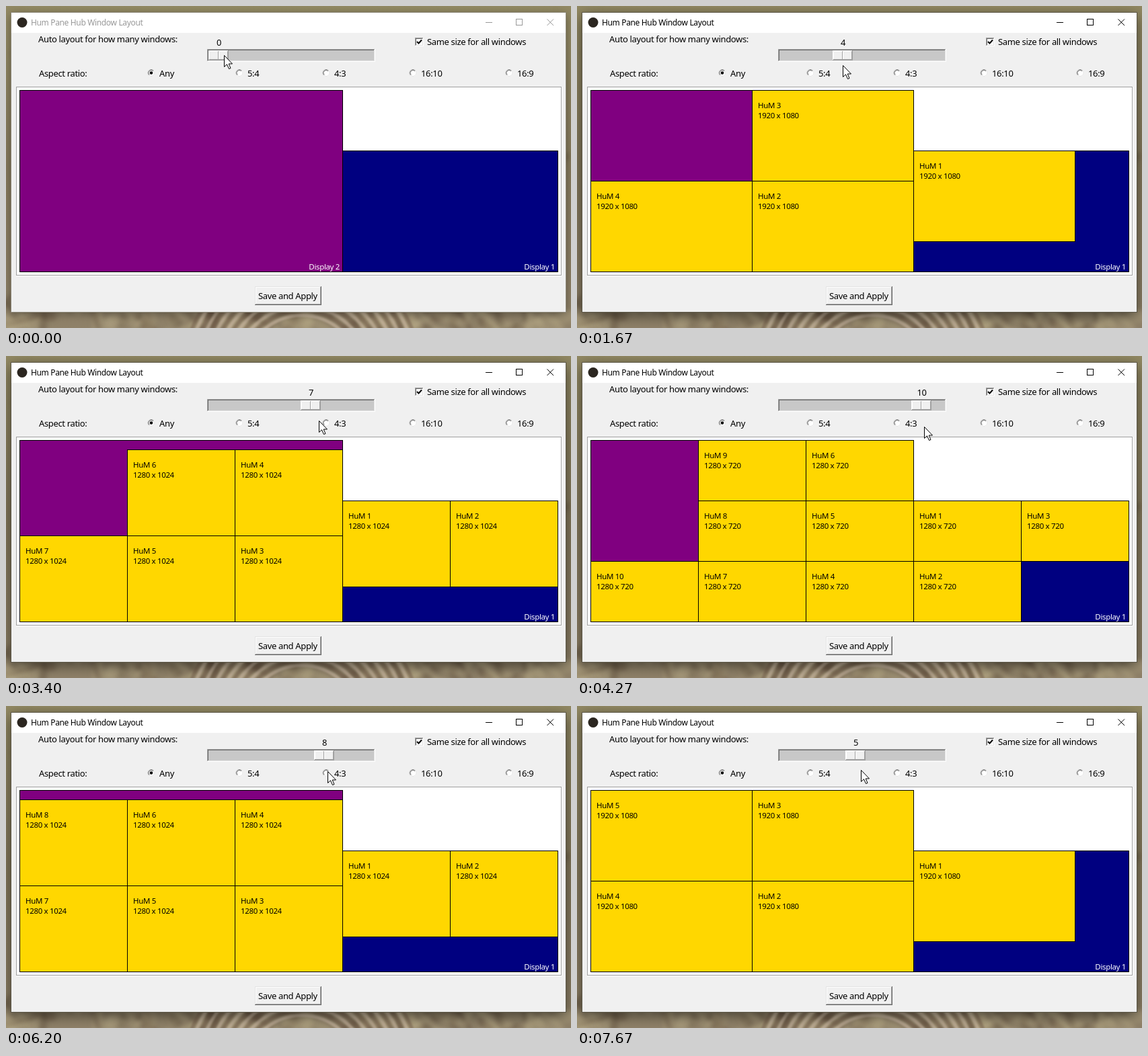
Write an HTML page with a canvas that moves like this. It is 840x479 px and loops after 8 s.

```html
<!DOCTYPE html>
<html lang="en">
<head>
<meta charset="utf-8">
<title>Window Layout</title>
<style>
  html, body { margin: 0; width: 100%; height: 100%; overflow: hidden; }
  canvas { display: block; }
</style>
</head>
<body>
<canvas id="stage" width="840" height="479"></canvas>
<script>
const ctx = document.getElementById('stage').getContext('2d');
const LOOP = 8000, STEP = 200 / 3, SCALE = 8;
const MAX = 11, UNIT = 216 / MAX, GRAB_X = 321, CLICK = 460;
const FACE = '#f0f0f0', LIGHT = '#e3e3e3', SHADE = '#a0a0a0', DARK = '#696969';

// Pointer moves: start, end, target x, target y
const moves = [
  [0, 200, 321, 72], [400, 1200, 375, 85], [1267, 1400, 383, 86],
  [1533, 1733, 397, 88], [1867, 2733, 425, 92], [2733, 3000, 436, 93],
  [3133, 3733, 481, 98], [3800, 4667, 528, 108], [4667, 5000, 536, 108],
  [5400, 5933, 508, 100], [6000, 6667, 441, 94], [7267, 7600, 422, 95]
];

const main = { name: 'Display 1', x: 500, y: 215, w: 320, h: 180, color: '#000080' };
const wide = { name: 'Display 2', x: 20, y: 125, w: 480, h: 270, color: '#800080' };
const screens = [wide, main];

// Each move slows down toward its target
function pointerAt(t) {
  let pos = [324, 73];
  for (const [start, end, ...to] of moves) {
    if (t <= start) break;
    const k = Math.sin(Math.min(1, (t - start) / (end - start)) * Math.PI / 2);
    pos = pos.map((v, i) => v + (to[i] - v) * k);
  }
  return pos.map(Math.round);
}

const rowsIn = (s, h) => Math.floor(s.h * SCALE / h);
const fits = (s, w, h) => Math.floor(s.w * SCALE / w) * rowsIn(s, h);

// Largest shared window size, between 5:4 and 16:9, that fits n times
function sizeFor(n) {
  let best = [0, 0];
  for (const a of screens) for (const b of screens)
    for (let cols = 1; cols < 5; cols++) for (let rows = 1; rows < 5; rows++) {
      const maxW = a.w * SCALE / cols, maxH = b.h * SCALE / rows;
      const w = Math.min(maxW, maxH * 16 / 9), h = Math.min(maxH, maxW * 4 / 5);
      if (fits(wide, w, h) + fits(main, w, h) >= n && w * h > best[0] * best[1]) best = [w, h];
    }
  return best;
}

function fill(x, y, w, h, color) {
  ctx.fillStyle = color;
  ctx.fillRect(x, y, w, h);
}

function line(color, width, ...pts) {
  ctx.strokeStyle = color;
  ctx.lineWidth = width;
  ctx.beginPath();
  pts.forEach(p => ctx.lineTo(...p));
  ctx.stroke();
}

function disc(x, y, r, color) {
  ctx.fillStyle = color;
  ctx.beginPath();
  ctx.arc(x, y, r, 0, 7);
  ctx.fill();
}

function text(str, x, y, size = 13, color = '#000', align = 'left') {
  ctx.font = `${size}px "Noto Sans", "Open Sans", sans-serif`;
  ctx.letterSpacing = '-0.35px';
  ctx.textAlign = align;
  ctx.fillStyle = color;
  ctx.fillText(str, x, y);
}

// Box with one-pixel edges
function bevel(x, y, w, h, face, topLeft, bottomRight) {
  fill(x, y, w, h, bottomRight);
  fill(x, y, w - 1, h - 1, topLeft);
  fill(x + 1, y + 1, w - 2, h - 2, face);
}

function sunken(x, y, w, h, face) {
  bevel(x, y, w, h, face, SHADE, '#fff');
  bevel(x + 1, y + 1, w - 2, h - 2, face, DARK, LIGHT);
}

function outlined(x, y, w, h, color) {
  fill(x, y, w + 1, h + 1, '#000');
  fill(x + 1, y + 1, w - 1, h - 1, color);
}

// Blurred wallpaper, painted once
function makeWallpaper() {
  const canvas = document.createElement('canvas');
  canvas.width = 840;
  canvas.height = 479;
  const c = canvas.getContext('2d');
  let seed = 7;
  const rand = () => (seed = seed * 16807 % 2147483647) / 2147483647;
  const g = c.createLinearGradient(0, 0, 0, 479);
  ['#928963', '#85795c', '#8f8168'].forEach((color, i) => g.addColorStop(i / 2, color));
  c.fillStyle = g;
  c.fillRect(0, 0, 840, 479);
  c.filter = 'blur(3px)';
  for (let i = 0; i < 160; i++) {
    c.fillStyle = ['rgba(80,62,45,.3)', 'rgba(190,175,140,.3)'][i % 2];
    c.beginPath();
    c.ellipse(rand() * 840, i % 4 ? 445 + rand() * 40 : rand() * 479, 8 + rand() * 22, 3 + rand() * 7, rand() * 3, 0, 7);
    c.fill();
  }
  c.filter = 'blur(1px)';
  c.lineWidth = 5;
  for (let r = 85; r < 180; r += 7) {
    c.strokeStyle = r % 2 ? 'rgba(215,195,175,.5)' : 'rgba(105,80,65,.4)';
    c.beginPath();
    c.arc(440, 545, r, 0, 7);
    c.stroke();
  }
  return canvas;
}
const wallpaper = makeWallpaper();

function drawBackdrop(active) {
  ctx.drawImage(wallpaper, 0, 0);
  ctx.save();
  ctx.shadowColor = active ? 'rgba(0,0,0,.55)' : 'rgba(0,0,0,.4)';
  ctx.shadowBlur = active ? 20 : 13;
  ctx.shadowOffsetY = active ? 5 : 3;
  fill(8, 10, 824, 445, FACE);
  ctx.restore();
}

function drawTitleBar(active) {
  const ink = active ? '#000' : '#999';
  ctx.strokeStyle = active ? '#5c5747' : '#8c8778';
  ctx.lineWidth = 1;
  ctx.strokeRect(7.5, 9.5, 825, 446);
  fill(8, 10, 824, 30, '#fff');
  disc(24, 24.5, 7.5, '#2b2620');
  text('Hum Pane Hub Window Layout', 37, 29, 12, ink);
  line(ink, 1, [713, 24.5], [723, 24.5]);
  ctx.strokeRect(758.5, 19.5, 9, 9);
  line(ink, 1, [804.5, 19.5], [814, 29]);
  line(ink, 1, [814, 19.5], [804.5, 29]);
}

function drawRadio(x, label, on) {
  const y = 99.5;
  const arc = (r, color, from) => {
    ctx.strokeStyle = color;
    ctx.lineWidth = 1;
    ctx.beginPath();
    ctx.arc(x, y, r, from * Math.PI, (from + 1) * Math.PI);
    ctx.stroke();
  };
  disc(x, y, 5.5, '#fff');
  arc(5, LIGHT, -.25);
  arc(5, SHADE, .75);
  arc(4, DARK, .75);
  if (on) disc(x, y, 2.2, '#000');
  text(label, x + 12, 105);
}

function drawControls(n) {
  text('Auto layout for how many windows:', 48, 54);
  text('Aspect ratio:', 49, 105);
  const left = Math.round(301 + n * UNIT);
  text(n, left + 15.5, 59, 13, '#000', 'center');
  sunken(299, 64, 250, 19, '#c8c8c8');
  bevel(left, 66, 30, 15, FACE, '#fff', SHADE);
  for (const dx of [1, 15]) bevel(left + dx, 67, 14, 13, FACE, '#fff', SHADE);

  sunken(608, 47, 13, 13, '#fff');
  line('#000', 2, [611, 53], [613.5, 55.5], [618, 50.5]);
  text('Same size for all windows', 626, 58);

  const radios = { 'Any': 216, '5:4': 347, '4:3': 476, '16:10': 605, '16:9': 748 };
  for (const label in radios) drawRadio(radios[label], label, label === 'Any');

  bevel(370, 417, 99, 28, FACE, LIGHT, DARK);
  bevel(371, 418, 97, 26, FACE, '#fff', SHADE);
  text('Save and Apply', 375, 436);
}

// Fill columns from the top left corner, or the bottom right when mirrored
function drawWindows(screen, first, count, size, mirrored) {
  const [w, h] = size.map(v => v / SCALE);
  const rows = rowsIn(screen, size[1]);
  for (let i = 0; i < count; i++) {
    const dx = Math.floor(i / rows) * w, dy = i % rows * h;
    const x = screen.x + (mirrored ? screen.w - w - dx : dx);
    const y = screen.y + (mirrored ? screen.h - h - dy : dy);
    outlined(x, y, w, h, '#ffd700');
    text(`HuM ${first + i}`, x + 9, y + 27, 11.5);
    text(size.join(' x '), x + 9, y + 42, 11.5);
  }
}

function drawLayout(n) {
  fill(15, 120, 812, 282, '#fff');
  ctx.strokeStyle = SHADE;
  ctx.lineWidth = 1;
  ctx.strokeRect(15.5, 120.5, 810, 280);
  for (const s of screens) {
    outlined(s.x, s.y, s.w, s.h, s.color);
    text(s.name, s.x + s.w - 4, s.y + s.h - 3, 11.5, '#fff', 'right');
  }
  if (!n) return;
  const size = sizeFor(n);
  const [inWide, inMain] = screens.map(s => fits(s, ...size));
  const onMain = Math.round(n * inMain / (inMain + inWide));
  drawWindows(wide, onMain + 1, n - onMain, size, true);
  drawWindows(main, 1, onMain, size, false);
}

function drawPointer(x, y) {
  ctx.save();
  ctx.translate(x + .5, y + .5);
  const arrow = new Path2D('M0 0V17L4 13.3L7 20L9.5 19L6.7 12.5H12Z');
  ctx.fillStyle = '#fff';
  ctx.fill(arrow);
  ctx.strokeStyle = '#000';
  ctx.lineWidth = 1;
  ctx.stroke(arrow);
  ctx.restore();
}

function draw(time) {
  const t = Math.floor((time + 5) / STEP) * STEP;
  const active = t > CLICK;
  const [x, y] = pointerAt(t);
  const n = Math.max(0, Math.min(MAX, Math.round((x - GRAB_X) / UNIT)));
  drawBackdrop(active);
  drawTitleBar(active);
  drawControls(n);
  drawLayout(n);
  drawPointer(x, y);
}

const start = performance.now();
function tick() {
  draw((performance.now() - start) % LOOP);
  requestAnimationFrame(tick);
}
tick();
</script>
</body>
</html>
```
